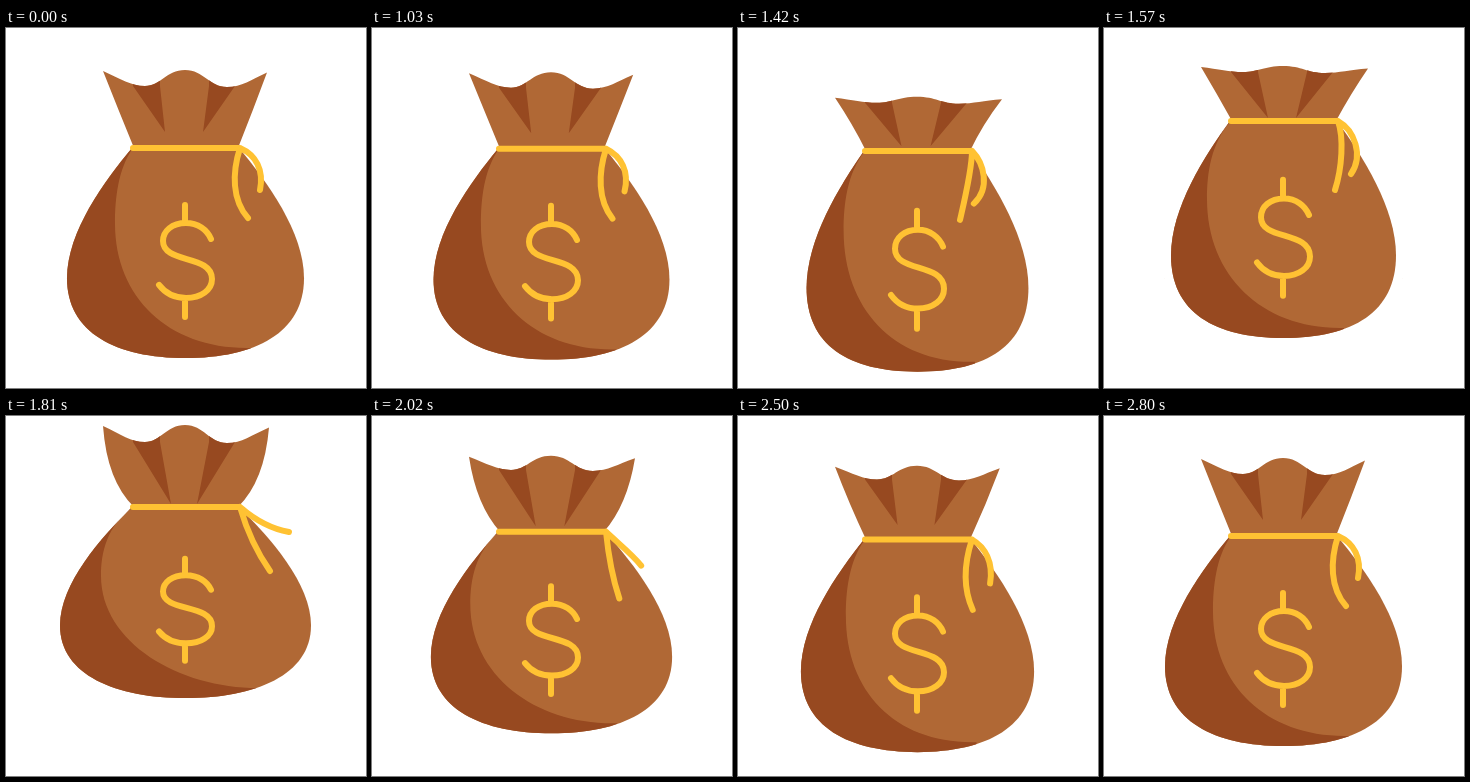
Write an HTML page that moves like this. It is 360 by 360 pixels and loops after 2830 ms.

```html
<!DOCTYPE html>
<html lang="en">
<head>
<meta charset="utf-8">
<title>Money bag</title>
<style>
  html, body { margin: 0; width: 100%; height: 100%; overflow: hidden; background: #fff; }
  svg { display: block; width: 100%; height: 100%; }
  .cloth { fill: #b06835; }
  .shade { fill: #974920; }
  .gold { fill: none; stroke: #ffc233; stroke-width: 6; stroke-linecap: round; stroke-linejoin: round; }
</style>
</head>
<body>
<svg viewBox="0 0 360 360">
  <defs>
    <clipPath id="bodyClip"><path id="bodyEdge"/></clipPath>
    <clipPath id="neckClip"><path id="neckEdge"/></clipPath>
  </defs>
  <path id="body" class="cloth"/>
  <path id="bodyShade" class="shade" clip-path="url(#bodyClip)"/>
  <path id="neck" class="cloth"/>
  <path id="folds" class="shade" clip-path="url(#neckClip)"/>
  <path id="dollar" class="gold"/>
  <path id="cord" class="gold"/>
</svg>
<script>
const LOOP = 2830, START = 1030, STEP = 30, CENTER = 179.5;
const $ = id => document.getElementById(id);

// Height of the cord over time; everything else hangs on it.
const cordTimes = [980, 1335, 1570, 1690, 1810, 2080, 2290, 2620, 2800];
const cordHeights = [120, 133.3, 93, 86.5, 91, 121, 129.3, 120.6, 120];

// body height, left edge, shade left, shade end, top, dip, fold tip, fold tip x, side x, side y, right corner
// then the two loose ends as curve offsets from the knot
const rest = [210, 61, 109, 245, 78, 62, 16, 159, 112, 39, 261,
  -8, 25, -8, 52, 8, 70, 16, 7, 24, 22, 20, 42];
const drop = [222, 69, 107, 236, 54, 48, 7, 163, 115, 27, 264,
  -5, 20, -11, 43, -15, 69, 9, 15, 15, 38, -2, 52];
const rise = [217, 67, 103, 240, 55, 49, 3, 164, 113, 27, 264,
  6, 17, 4, 47, -3, 69, 16, 9, 26, 34, 13, 53];
const squash = [191, 54, 95, 257, 82, 65, 3, 165, 101, 26, 263,
  7, 24, 18, 47, 30, 64, 15, 13, 32, 22, 49, 25];
const land = [217, 66, 105, 228, 67, 57, 11, 161, 110, 28, 263,
  -6, 19, -11, 43, -11, 71, 8, 8, 18, 24, 15, 47];
const nearRest = rest.map((v, i) => v + (land[i] - v) * 0.07);
const poseTimes = [980, 1300, 1570, 1810, 2290, 2620, 2800];
const poses = [rest, drop, rise, squash, land, nearRest, rest];

// Monotone cubic interpolation: flat at every turning point.
function track(times, values, t) {
  const last = times.length - 1;
  if (t <= times[0]) return values[0];
  if (t >= times[last]) return values[last];
  const slope = i => (values[i + 1] - values[i]) / (times[i + 1] - times[i]);
  const tangent = i => {
    if (i === 0 || i === last) return 0;
    const a = slope(i - 1), b = slope(i);
    return a * b > 0 ? 2 * a * b / (a + b) : 0;
  };
  let i = 0;
  while (t >= times[i + 1]) i++;
  const span = times[i + 1] - times[i], u = (t - times[i]) / span;
  const ease = u * u * (3 - 2 * u);
  return values[i] + (values[i + 1] - values[i]) * ease
    + span * u * (1 - u) * ((1 - u) * tangent(i) - u * tangent(i + 1));
}

function draw(time) {
  const t = time < START ? 0 : START + Math.floor((time - START) / STEP) * STEP;
  const k = track(cordTimes, cordHeights, t);
  const pose = rest.map((_, i) => track(poseTimes, poses.map(p => p[i]), t));
  const [h, left, shade, shadeEnd, top, dip, tip, tipX, sideX, sideY, corner] = pose;
  const ends = pose.slice(11);
  const y = part => k + h * part;
  const mirror = x => 2 * CENTER - x;
  const bottom = k + h, right = mirror(left), hip = 126 - 0.43 * (126 - left);

  const body = `M126 ${k} C${hip} ${y(.16)} ${left} ${y(.4)} ${left} ${y(.62)}
    C${left} ${y(.88)} 110 ${bottom} ${CENTER} ${bottom}
    C249 ${bottom} ${right} ${y(.88)} ${right} ${y(.62)}
    C${right} ${y(.4)} ${mirror(hip)} ${y(.16)} 233 ${k}Z`;
  $('body').setAttribute('d', body);
  $('bodyEdge').setAttribute('d', body);
  $('bodyShade').setAttribute('d', `M127 ${k} C${126 - .82 * (126 - shade)} ${y(.1)} ${shade} ${y(.24)} ${shade} ${y(.36)}
    C${shade} ${y(.72)} ${shadeEnd - 80} ${bottom - 8} ${shadeEnd} ${bottom - 10}
    V${bottom + 20} H0 V${k}Z`);

  const peak = k - top, low = k - dip;
  const neck = `M128 ${k} Q${sideX} ${k - sideY} 97 ${peak + 1}
    C115 ${peak + (low - peak) * .55} 125 ${low} 139 ${low}
    C155 ${low} 160 ${peak} 179 ${peak}
    C198 ${peak} 203 ${low + 1} 221 ${low + 1}
    C236 ${low + 1} 245 ${peak + (low - peak) * .6} ${corner} ${peak + 2.5}
    Q${mirror(sideX) + .5} ${k - sideY} 232 ${k}Z`;
  $('neck').setAttribute('d', neck);
  $('neckEdge').setAttribute('d', neck);
  $('folds').setAttribute('d', `M127 ${low - 12} V${low} L${tipX} ${k - tip} L154 ${low} V${low - 12}Z
    M203 ${low - 12} V${low} L${356 - tipX} ${k - tip} L229 ${low} V${low - 12}Z`);

  $('dollar').setAttribute('d', `M179 ${y(.271)} V${y(.357)} M179 ${y(.714)} V${y(.805)}
    M205 ${y(.433)} C201 ${y(.39)} 192 ${y(.357)} 180 ${y(.357)}
    C166 ${y(.357)} 157 ${y(.395)} 157 ${y(.443)}
    C157 ${y(.552)} 206 ${y(.505)} 206 ${y(.624)}
    C206 ${y(.676)} 195 ${y(.714)} 180 ${y(.714)}
    C168 ${y(.714)} 159 ${y(.69)} 153 ${y(.652)}`);
  $('cord').setAttribute('d', `M127 ${k} H234 c${ends.slice(0, 6).join(' ')}
    M234 ${k} c${ends.slice(6).join(' ')}`);
}

let begin;
function tick(now) {
  begin ??= now;
  draw((now - begin) % LOOP);
  requestAnimationFrame(tick);
}
draw(0);
requestAnimationFrame(tick);
</script>
</body>
</html>
```
